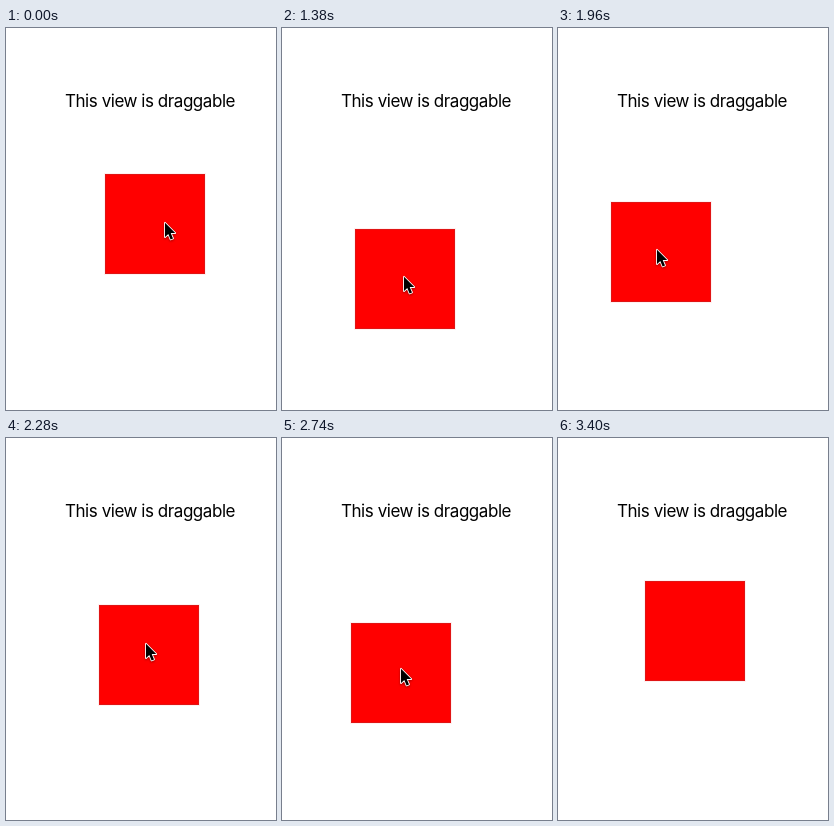
An HTML page for the animation above (3.88 s loop, 270 px wide and 382 px high).

```html
<!DOCTYPE html>
<html lang="en">
<head>
<meta charset="utf-8">
<title>Draggable view</title>
<style>
  html, body { margin: 0; width: 100%; height: 100%; overflow: hidden; background: #fff; }
  svg { display: block; width: 100%; height: 100%; }
  text { font: 17px Inter, "Open Sans", sans-serif; letter-spacing: -0.45px; }
  #cursor { filter: drop-shadow(0 1px 1px rgba(0, 0, 0, .35)); }
</style>
</head>
<body>
<svg viewBox="0 0 270 382">
  <text x="144" y="78.5" text-anchor="middle">This view is draggable</text>
  <g id="box">
    <rect x="-1" y="-1" width="102" height="102" fill="#fff0f0"/>
    <rect width="100" height="100" fill="#e01414"/>
    <rect x="1" y="1" width="98" height="98" fill="#f00"/>
  </g>
  <g id="cursor">
    <path d="M1 1.8V16L4.3 13L6.6 18.4L9 17.4L6.7 12.1H11.2Z" fill="#000" stroke="#fff"
          stroke-width="1.8" stroke-linejoin="round" paint-order="stroke"/>
  </g>
</svg>
<script>
const LOOP = 3880, STEP = 20;
const GRAB = [45, 42];  // cursor tip relative to the box while dragging
const LEAD = 20;        // ms the box lags behind the cursor

// Turning points [time, position] of the circling drag, one list per axis
const turnsX = [[1140, 99], [1360, 72], [1570, 113], [1970, 53], [2330, 95], [2640, 55], [2900, 97], [2980, 87]];
const turnsY = [[1140, 146], [1470, 212], [1770, 146], [2110, 193], [2460, 139], [2790, 188], [2980, 143]];

const clamp = k => Math.min(1, Math.max(0, k));
const progress = (t, from, to) => clamp((t - from) / (to - from));
const mix = (a, b, k) => a + (b - a) * k;
const sine = k => (1 - Math.cos(Math.PI * k)) / 2;

function swing(turns, t) {
  const next = turns.findIndex(turn => turn[0] > t);
  if (next === 0) return turns[0][1];
  if (next < 0) return turns[turns.length - 1][1];
  const [t0, from] = turns[next - 1], [t1, to] = turns[next];
  return mix(from, to, sine(progress(t, t0, t1)));
}

const boxAt = t => [swing(turnsX, t), swing(turnsY, t)];

function cursorAt(t) {
  const settle = progress(t, 20, 120), rise = sine(progress(t, 320, 800));
  const hover = [158 - 2 * rise, 193 - 2 * settle - 8 * rise];
  const held = boxAt(t + LEAD).map((v, i) => v + GRAB[i]);
  const grab = progress(t, 1120, 1220);
  const exit = progress(t, 3280, 3380) ** 1.5;
  return [38, 90].map((end, i) => mix(mix(hover[i], held[i], grab), end, exit));
}

const box = document.getElementById("box");
const cursor = document.getElementById("cursor");
const place = (node, point) =>
  node.setAttribute("transform", `translate(${point.map(Math.round)})`);

function draw() {
  const t = Math.floor(performance.now() % LOOP / STEP) * STEP;
  place(box, boxAt(t));
  place(cursor, cursorAt(t));
  cursor.setAttribute("visibility", t < 3400 ? "visible" : "hidden");
  requestAnimationFrame(draw);
}
draw();
</script>
</body>
</html>
```
